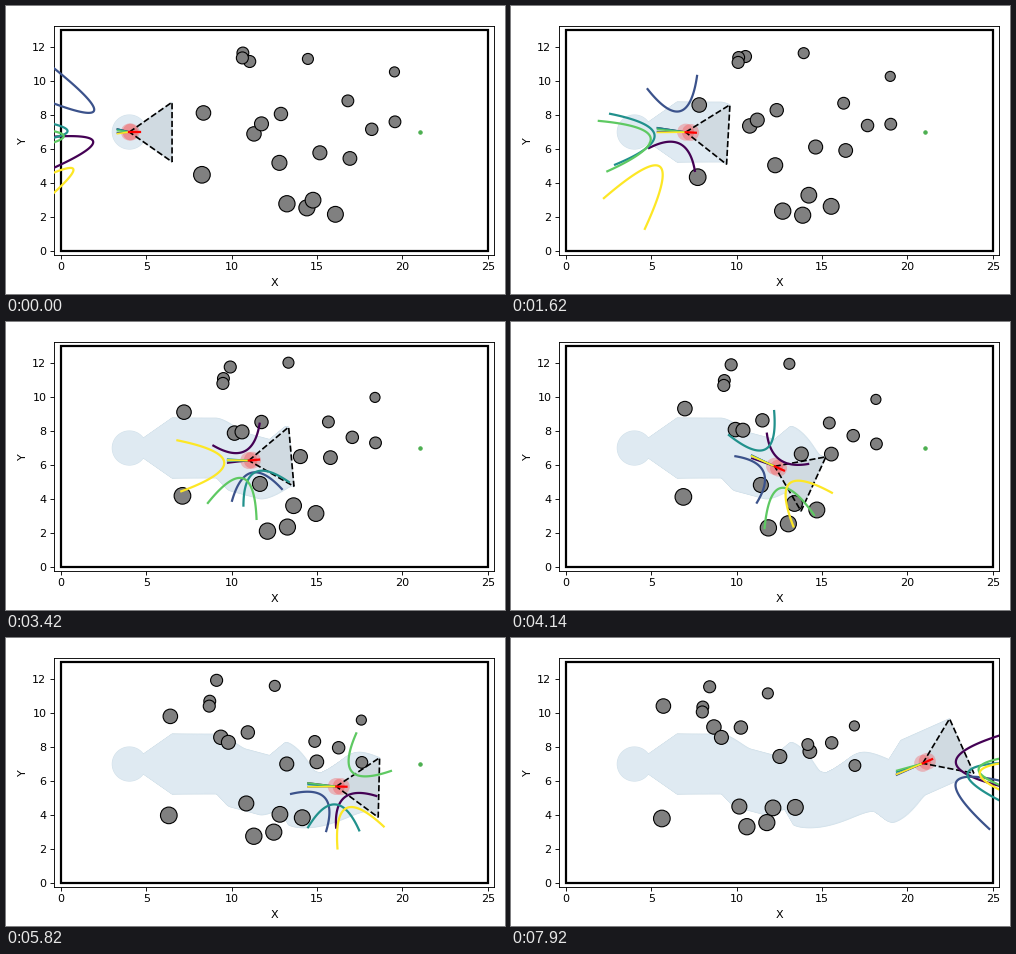
Animation, 499 px wide and 288 px high, one loop 7980 ms. Source, as a matplotlib script:

```python
import numpy as np
import matplotlib.pyplot as plt
from matplotlib.animation import FuncAnimation
from matplotlib.collections import PolyCollection
from matplotlib.patches import Circle, Polygon, Rectangle

W, H, DPI = 499, 288, 80
FRAMES, INTERVAL, DT = 133, 60, 0.1
SUB = 5                   # path samples per frame
START, GOAL = np.array([4, 7]), (21, 7)
ROBOT_R, TOP_SPEED = 0.5, 1.45
FOV_DEPTH, FOV_HALF = 2.5, 1.75
NEAREST = 5
DRIFT = -0.2              # shared x velocity of the obstacles
Y_MIN, Y_MAX = 2, 12.05   # obstacles bounce between these

# vertical velocity: starting points
SWARM = {
    -.16: [(13.23, 2.79), (14.40, 2.55)],
    .173: [(16.07, 2.17), (16.92, 5.45), (8.34, 8.12), (11.30, 6.89)],
    .126: [(14.46, 11.29), (15.16, 5.78)],
    .108: [(14.76, 3.00), (11.05, 11.14)],
    .082: [(11.74, 7.48), (18.20, 7.16), (12.88, 8.06)],
    -.052: [(16.80, 8.83), (19.56, 7.60), (12.79, 5.19), (8.25, 4.49)],
    -.098: [(10.65, 11.64), (10.62, 11.35), (19.53, 10.53)],
}
X0, Y0 = np.array([p for group in SWARM.values() for p in group]).T
VY = np.repeat(list(SWARM), [len(group) for group in SWARM.values()])
RADII = 0.63 - 0.008 * X0 - 0.017 * Y0   # smaller towards the upper right


def direction(a):
    return np.stack([np.cos(a), np.sin(a)], axis=-1)


def ease(n, keys):
    """Smoothstep between (time, value) key points."""
    t, v = np.array(keys, float).T
    k = np.clip(np.searchsorted(t, n, "right") - 1, 0, len(t) - 2)
    u = np.clip((n - t[k]) / (t[k + 1] - t[k]), 0, 1)
    return v[k] + (v[k + 1] - v[k]) * u * u * (3 - 2 * u)


def drive():
    """Positions, headings and speeds along the finely sampled path."""
    n = np.arange((FRAMES - 1) * SUB + 1) / SUB
    heading = np.radians(ease(n, [(24, 0), (34, -15), (46, -15), (56, 6),
                                  (66, -26), (90, 8), (102, -7), (111, 24)]))
    slowdown = 0.45 * np.exp(-((n - 60) / 10) ** 2)
    speed = np.minimum(0.5 + 0.05 * n, TOP_SPEED) - slowdown
    step = DT / SUB * speed[:, None] * direction(heading)
    return START + np.cumsum(step, 0) - step, heading, speed


def view_cone(p, a):
    fwd = direction(a)
    side = FOV_HALF * np.array([-fwd[1], fwd[0]])
    tip = p + FOV_DEPTH * fwd
    return np.array([p, tip + side, tip - side])


def obstacle_state(i):
    """Centres and velocities, reflecting off the lower and upper limits."""
    t, span = i * DT, Y_MAX - Y_MIN
    phase = (Y0 + VY * t - Y_MIN) % (2 * span)
    bounced = phase > span
    y = Y_MIN + np.where(bounced, 2 * span - phase, phase)
    vel = np.c_[np.full(len(y), DRIFT), np.where(bounced, -VY, VY)]
    return np.c_[X0 + DRIFT * t, y], vel


def parabola(p, rel_pos, rel_vel, radius):
    """Safety parabola in relative-velocity space, drawn around the robot."""
    d = np.linalg.norm(rel_pos)
    gap = np.sqrt(max(d * d - (radius + ROBOT_R) ** 2, 0.01))
    lam, mu = 0.5 * gap / np.linalg.norm(rel_vel), 0.5 * gap
    s = np.linspace(-1.5, 1.5, 80)
    along = -lam * s ** 2 - mu
    ux, uy = rel_pos / d
    return p[0] + along * ux - s * uy, p[1] + along * uy + s * ux


POS, HEADING, SPEED = drive()
CONES = [view_cone(p, a) for p, a in zip(POS, HEADING)]
DISC = START + direction(np.linspace(0, 2 * np.pi, 80))

fig = plt.figure(figsize=(W / DPI, H / DPI), dpi=DPI, facecolor="white")
left, right, top, bottom = 48.2, 488.2, 20.4, 248.7
ax = fig.add_axes([left / W, 1 - bottom / H,
                   (right - left) / W, (bottom - top) / H])
ax.set(xlim=(-0.404, 25.373), ylim=(-0.2, 13.2),
       xticks=range(0, 26, 5), yticks=range(0, 13, 2))
ax.set_xlabel("X", labelpad=5)
ax.set_ylabel("Y")

ax.add_patch(Rectangle((0, 0), 25, 13, fill=False, lw=2, zorder=2))
ax.plot(*GOAL, "o", ms=3, color="#4caf50", zorder=0.9)

# Outline below, fill above: only the rim of the union shows.
seen = [PolyCollection([DISC], facecolor="#dfeaf2", edgecolor=rim, lw=1,
                       zorder=z)
        for rim, z in (("#d3e2eb", 1), ("none", 1.1))]
for layer in seen:
    ax.add_collection(layer, autolim=False)

cone_fill = ax.add_patch(Polygon(CONES[0], fc="gray", ec="none", alpha=.15,
                                 zorder=1.5))
cone_line = ax.add_patch(Polygon(CONES[0], fill=False, ec="black", lw=1.5,
                                 ls="--", zorder=4))
balls = [ax.add_patch(Circle((0, 0), r, fc="gray", ec="black", lw=1,
                             zorder=3)) for r in RADII]
bodies = [ax.add_patch(Circle((0, 0), ROBOT_R, fc="red", ec="none", alpha=.22,
                              zorder=3.5)) for _ in range(2)]
colors = plt.cm.viridis(np.linspace(0, 1, NEAREST))
curves = [ax.plot([], [], color=c, lw=2, zorder=5)[0] for c in colors]
rays = [ax.plot([], [], color=c, lw=1.5, zorder=5)[0] for c in colors]
nose, = ax.plot([], [], color="red", lw=2, zorder=6)


def update(i):
    k = i * SUB
    p, fwd = POS[k], direction(HEADING[k])
    vel = SPEED[k] * fwd

    for layer in seen:
        layer.set_verts([DISC] + CONES[:k + 1])
    for cone in (cone_fill, cone_line):
        cone.set_xy(CONES[k])

    centers, speeds = obstacle_state(i)
    for ball, c in zip(balls, centers):
        ball.center = c
    for j, body in enumerate(bodies):
        body.center = p + 2 * j * DT * vel
    nose.set_data(*zip(p, p + 0.6 * fwd))

    gaps = np.linalg.norm(centers - p, axis=1) - RADII
    for curve, ray, j in zip(curves, rays, np.argsort(gaps)):
        rel = speeds[j] - vel
        curve.set_data(*parabola(p, centers[j] - p, rel, RADII[j]))
        ray.set_data(*zip(p, p + rel))
    return [*seen, cone_fill, cone_line, nose,
            *balls, *bodies, *curves, *rays]


anim = FuncAnimation(fig, update, frames=FRAMES, interval=INTERVAL,
                     repeat=True, repeat_delay=0, blit=False)
plt.show()
```
